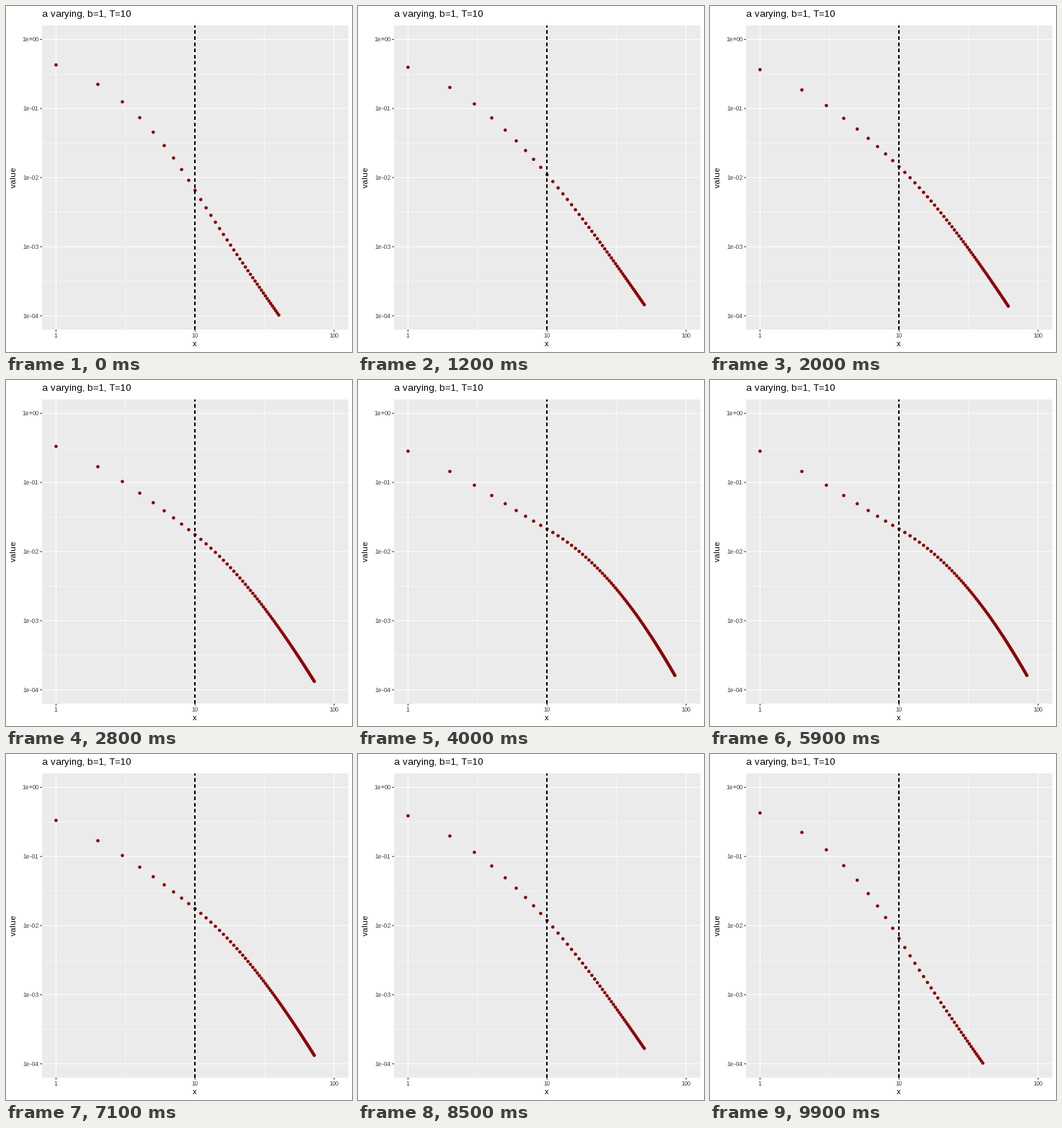
A matplotlib script that plays this animation: 480 px wide and 480 px high, repeating every 10000 ms.

```python
import numpy as np
import matplotlib.pyplot as plt
from matplotlib.animation import FuncAnimation
from matplotlib.patches import Rectangle

SIZE, DPI = 480, 72            # at 72 dpi one point is one pixel
FRAMES, INTERVAL = 100, 100
LAST = FRAMES // 2 - 1         # plays forwards, then backwards

LEFT, RIGHT, TOP, BOTTOM = 50.1, 474.5, 27.1, 449.0
X0, X_DECADE = 69.4, 192.9
Y0, Y_DECADE = 46.3, 95.87

POINTS = 100
STATES = 6                     # values of a after the first one
T = 10
x = np.arange(1, POINTS + 1)


def distribution(step):
    """Probability of stopping at x; the waiting time 1/hazard bends at T."""
    base = 2.12 - 0.0043 * step
    early = 0.22 + 0.014 * step + 0.00054 * step ** 2
    late = 0.57 - 0.0078 * step
    power = 1 + 1.3 * (1 - step / LAST) ** 4
    inner = np.minimum(x, T)
    bend = (late - early) * inner * (inner / T) ** power / (power + 1)
    hazard = 1 / (base + early * inner + bend + late * (x - inner))
    survival = np.cumprod(1 - hazard)
    return hazard * np.append(1, survival[:-1])


def visible(step):
    """Points are added each time the next value of a is reached."""
    state = int((step + 0.5) * STATES / LAST)
    return min(POINTS, int(40 + 10.8 * state))


plt.rcParams["font.family"] = "Liberation Sans"
plt.rcParams["text.hinting_factor"] = 1    # whole-pixel letter spacing
fig = plt.figure(figsize=(SIZE / DPI, SIZE / DPI), dpi=DPI, facecolor="white")
ax = fig.add_axes([0, 0, 1, 1])
ax.set_xlim(0, SIZE)
ax.set_ylim(SIZE, 0)
ax.axis("off")


def line(xs, ys, color, width=1.07, z=1, **style):
    ax.plot(xs, ys, color=color, lw=width, zorder=z, snap=False,
            solid_capstyle="butt", dash_capstyle="butt", **style)


def label(px, py, text, size, color="black", ha="center", **style):
    ax.text(px, py, text, fontsize=size, color=color, ha=ha, va="baseline", **style)


def grid_x(px, width):
    line([px, px], [TOP, BOTTOM], "white", width)


def grid_y(py, width):
    line([LEFT, RIGHT], [py, py], "white", width)


ax.add_patch(Rectangle((LEFT, TOP), RIGHT - LEFT, BOTTOM - TOP,
                       fc="#EBEBEB", lw=0, zorder=0))

for n in range(2):
    grid_x(X0 + (n + 0.5) * X_DECADE, 0.53)
for n in range(4):
    grid_y(Y0 + (n + 0.5) * Y_DECADE, 0.53)

for n in range(3):
    px = X0 + n * X_DECADE
    grid_x(px, 1.07)
    line([px, px], [BOTTOM, BOTTOM + 2.75], "#333333")
    label(px, 460.4, str(10 ** n), 9, "#4D4D4D")

for n in range(5):
    py = Y0 + n * Y_DECADE
    grid_y(py, 1.07)
    line([LEFT - 2.75, LEFT], [py, py], "#333333")
    label(45.1, py + 3.1, f"{10.0 ** -n:.0e}", 9, "#4D4D4D", ha="right")

label(LEFT, 15, "a varying, b=1, T=10", 13, ha="left")
label(262.3, 471.8, "x", 11)
label(13.5, 237, "value", 11, rotation=90, rotation_mode="anchor")

# One colour per point keeps the dots at sub-pixel positions
point_x = X0 + X_DECADE * np.log10(x)
dots = ax.scatter(point_x, point_x, s=4.6 ** 2, c=["#8B0000"] * POINTS,
                  linewidths=0, zorder=2)

# Stacked copies harden the soft edges of the thin dashes
for _ in range(15):
    line([X0 + X_DECADE] * 2, [BOTTOM, TOP], "black", z=3, linestyle=(0, (4, 4)))


def draw(frame):
    step = min(frame, FRAMES - 1 - frame)
    point_y = Y0 - Y_DECADE * np.log10(distribution(step))
    dots.set_offsets(np.column_stack([point_x, point_y])[:visible(step)])
    return [dots]


anim = FuncAnimation(fig, draw, frames=FRAMES, interval=INTERVAL,
                     repeat=True, repeat_delay=0)
plt.show()
```
